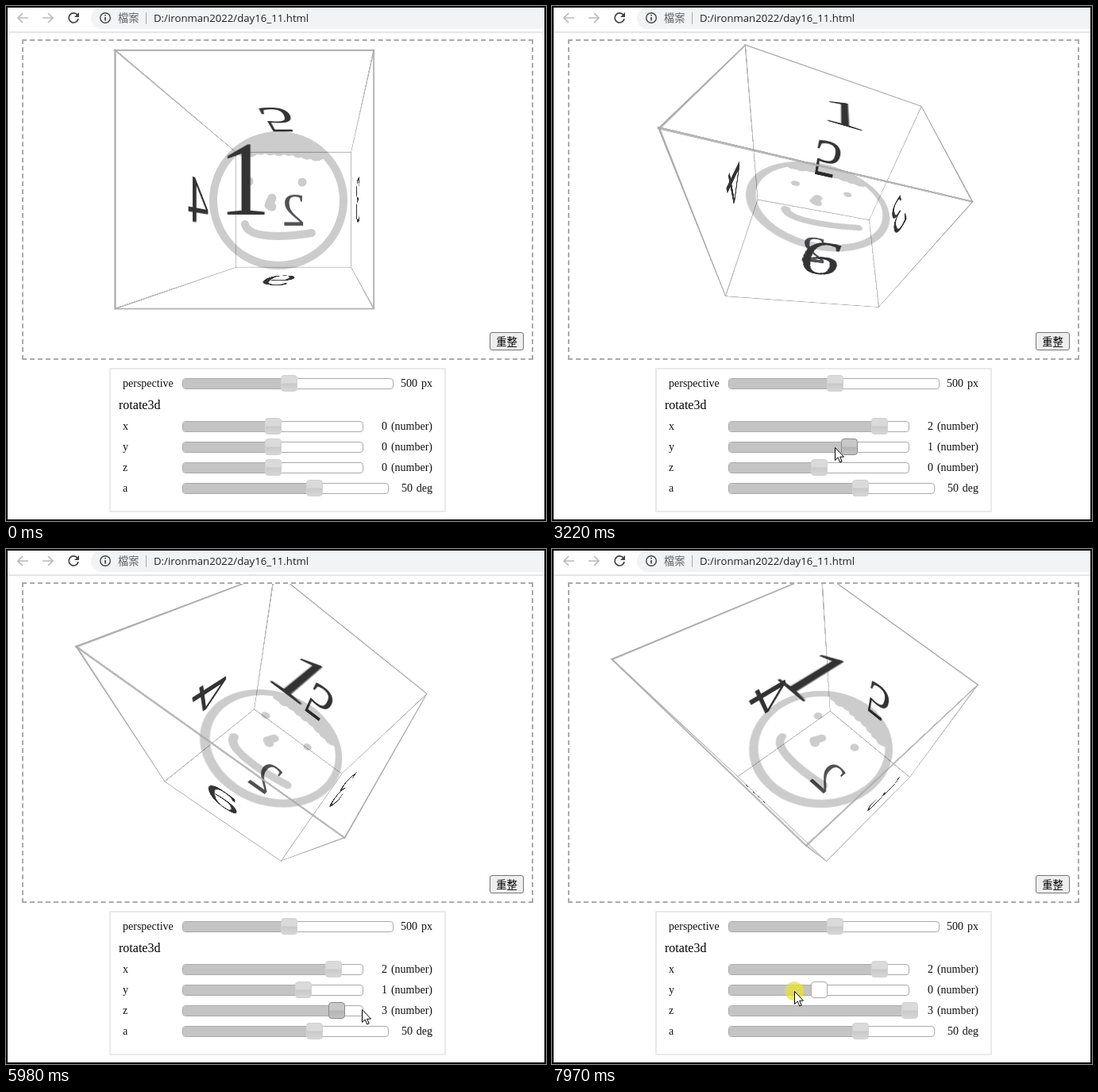
Write an HTML page that moves like this. It is 680 px wide and 649 px high and loops after 8000 ms.

```html
<!DOCTYPE html>
<html lang="zh-Hant">
<head>
<meta charset="utf-8">
<title>rotate3d</title>
<style>
html, body { margin: 0; width: 100%; height: 100%; overflow: hidden; background: #fff; }
body { position: relative; font: 14px/20px "Liberation Serif", serif; color: #111; }
body *, body::after { position: absolute; box-sizing: border-box; white-space: nowrap; }
body::after { content: ""; inset: 0; border: 2px solid #000; }
svg { overflow: visible; }
svg * { position: static; }

#pill { left: 107px; top: 2px; width: 580px; height: 27px; border-radius: 14px 0 0 14px; background: #f1f3f4; }
#line { left: 0; top: 32px; width: 100%; height: 2px; background: #e4e5e7; }
#icons { left: 0; top: 0; fill: none; stroke-width: 1.7; }
.bar { top: 5px; font: 13.2px/20px "Open Sans", "Noto Sans CJK TC", "Noto Sans CJK", sans-serif; color: #202124; }

#stage { left: 20px; top: 42px; width: 644px; height: 404px; border: 2px dashed #aaa;
  overflow: hidden; perspective: 353px; perspective-origin: 416px 260.5px; }
#cube { left: 320.5px; top: 200.5px; width: 0; height: 0; transform-style: preserve-3d; }
.face { left: -101px; top: -101px; width: 202px; height: 202px; border: 1px solid #aaa;
  font: 82px/200px "Liberation Serif", serif; text-align: center; color: #333; }
#smile { left: 0; top: 0; width: 1px; height: 1px; opacity: .2; fill: none; stroke: #000; stroke-linecap: round; stroke-linejoin: round; }
#reset { left: 609px; top: 411px; width: 43px; height: 23px; border: 1px solid #767676; border-radius: 3px;
  background: #efefef; font: 13.33px/22px "Noto Sans CJK TC", "Noto Sans CJK", sans-serif; text-align: center; color: #000; }

#panel { left: 130px; top: 456px; width: 424px; height: 182px; border: 2px solid #e9e9e9; }
#title { left: 142px; top: 493px; font-size: 16px; color: #000; }
.row { left: 0; width: 680px; height: 20px; }
.name { left: 147px; }
.unit { right: 143px; }
.track { left: 222px; top: 3px; height: 14px; border: 1px solid #aaa; border-radius: 4px; background: #fff; }
.fill { left: 0; top: 0; height: 12px; background: #c4c4c4; border-radius: 3px 0 0 3px; }
.knob { top: -1px; width: 21px; height: 21px; border-radius: 4px; border: 1px solid #d2d2d2;
  background: linear-gradient(#dadada 48%, #c9c9c9 52%, #d6d6d6); }
.knob.focus { border-color: #8c8c8c; background: linear-gradient(#c8c8c8 48%, #b4b4b4 52%, #c2c2c2); }
.knob.press { border-color: #aaa; background: #fff; }

#halo { width: 24px; height: 24px; margin: -12px; border-radius: 50%; background: rgba(232, 228, 40, .72); }
#cursor { left: 0; top: 0; width: 13px; height: 20px; }
</style>
</head>
<body>
<div id="pill"></div>
<div id="line"></div>
<svg id="icons" width="200" height="32">
  <path stroke="#bbb" d="M28 15H15M21 9l-6 6 6 6M46 15h13M53 9l6 6-6 6"/>
  <path stroke="#444" d="M90 11.5A6 6 0 1 0 91 16"/>
  <path fill="#444" d="M92 8v6h-6z"/>
  <circle cx="125" cy="15" r="6.3" stroke="#444" stroke-width="1.4"/>
  <path stroke="#444" d="M125 14v4.5M125 11v1.6"/>
  <path stroke="#aaa" stroke-width="1" d="M176.5 8v15"/>
</svg>
<div class="bar" style="left:141px;color:#5f6368">檔案</div>
<div class="bar" style="left:186px">D:/ironman2022/day16_11.html</div>

<div id="stage"><div id="cube">
  <svg id="smile">
    <circle r="82" stroke-width="10"/>
    <path fill="#000" stroke-width="9" d="M-46-60 Q0-105 48-62 L54-56 Q46-51 42-58 Q35-53 30-60 Q24-55 19-63 Q13-58 7-64 Q1-57-5-64 Q-11-58-16-65 Q-23-59-28-65 Q-33-56-38-61z"/>
    <path stroke-width="11" d="M-37-24h.01M30-23h.01M-8-3L-12 6L-8 8"/>
    <path stroke-width="10" d="M-42 30C-38 48 5 47 42 41"/>
  </svg>
</div></div>
<div id="reset">重整</div>

<div id="panel"></div>
<div id="title">rotate3d</div>
<div id="halo"></div>
<svg id="cursor"><path d="M.5 .5V16.5L4.2 13l2.6 6 2.4-1-2.5-5.8H11.5z" fill="#fff" stroke="#000"/></svg>

<script>
const LOOP = 8000, GLIDE = 400, TURN_DELAY = 80, ANGLE = 50;
const $ = id => document.getElementById(id);

// Press time, axis, value chosen
const clicks = [
  [1040, 0, 1], [1904, 0, 2], [2715, 1, 1], [3717, 2, 1],
  [4925, 2, 2], [5900, 2, 3], [7080, 1, 0], [8010, 1, -1]
];
// Time, x, y of the pointer
const path = [
  [200, 338, 609], [450, 376, 575], [700, 366, 524], [950, 371, 534], [1560, 371, 534],
  [1840, 402, 529], [2240, 402, 529], [2330, 389, 544], [2510, 356, 555], [3180, 356, 555],
  [3500, 364, 575], [3640, 366, 579], [4100, 366, 579], [4390, 395, 578], [4590, 397, 575],
  [4780, 397, 575], [4880, 408, 578], [5350, 408, 578], [5750, 448, 580], [6450, 448, 580],
  [6810, 361, 560], [7000, 345, 556], [7400, 345, 556], [7850, 305, 557], [8000, 305, 557]
];

const clamp = v => Math.min(1, Math.max(0, v));
const mix = (a, b, p) => a + (b - a) * p;
const swing = p => .5 - Math.cos(Math.PI * clamp(p)) / 2;
const smooth = p => (p = clamp(p), p * p * (3 - 2 * p));

const turns = ['', 'rotateY(180deg)', 'rotateY(90deg)', 'rotateY(-90deg)', 'rotateX(90deg)', 'rotateX(-90deg)'];
turns.forEach((turn, i) => {
  const face = document.createElement('div');
  face.className = 'face';
  face.textContent = i + 1;
  face.style.transform = `perspective(1000px) ${turn} translateZ(100px)`;
  if (i === 1) face.style.color = '#505054';
  $('cube').append(face);
});

function addRow(name, y, width, knobX, value, unit, gap) {
  const row = document.createElement('div');
  row.className = 'row';
  row.style.top = y - 10 + 'px';
  row.innerHTML = `<div class="name">${name}</div>
    <div class="track" style="width:${width}px"><div class="fill"></div></div><div class="knob"></div>
    <div class="unit">${unit}</div><div class="value" style="right:${143 + gap}px">${value}</div>`;
  $('halo').before(row);
  const [fill, knob, label] = ['.fill', '.knob', '.value'].map(s => row.querySelector(s));
  const move = x => {
    fill.style.width = x - 223 + 'px';
    knob.style.left = x - 10 + 'px';
  };
  move(knobX);
  return { knob, label, move };
}
addRow('perspective', 476, 266, 355.5, 500, 'px', 19);
const rows = ['x', 'y', 'z'].map((n, i) => addRow(n, 530 + 26 * i, 228, 336, 0, '(number)', 57));
addRow('a', 608, 260, 388, 50, 'deg', 25);

function quat(axis) {
  const len = Math.hypot(...axis), half = ANGLE * Math.PI / 360;
  return len ? [...axis.map(v => v / len * Math.sin(half)), Math.cos(half)] : [0, 0, 0, 1];
}
function slerp(a, b, p) {
  const o = Math.acos(Math.min(1, a.reduce((s, v, i) => s + v * b[i], 0)));
  if (o < 1e-5) return b;
  return a.map((v, i) => (v * Math.sin((1 - p) * o) + b[i] * Math.sin(p * o)) / Math.sin(o));
}

function pointer(t) {
  const i = Math.max(1, path.findIndex(k => k[0] > t));
  const [a, b] = [path[i - 1], path[i]], p = smooth((t - a[0]) / (b[0] - a[0]));
  return [mix(a[1], b[1], p), mix(a[2], b[2], p)];
}

function draw(t) {
  const values = [0, 0, 0], knobs = [0, 0, 0], target = [0, 0, 0];
  let q = quat(target), focus = -1, press = -1;
  for (const [start, axis, value] of clicks) {
    if (Math.abs(t - start) < 60) press = axis;
    if (t < start) continue;
    focus = axis;
    values[axis] = value;
    knobs[axis] = mix(knobs[axis], value, swing((t - start) / GLIDE));
    target[axis] = value;
    q = slerp(q, quat(target), smooth((t - start - TURN_DELAY) / GLIDE));
  }
  rows.forEach((row, i) => {
    row.move(336 + 38 * knobs[i]);
    row.label.textContent = values[i];
    row.knob.className = 'knob' + (i === press ? ' press' : i === focus ? ' focus' : '');
  });
  $('cube').style.transform = `rotate3d(${q.slice(0, 3).map(v => v.toFixed(6))},${(2 * Math.acos(Math.min(1, q[3]))).toFixed(6)}rad)`;

  const [x, y] = pointer(t);
  $('cursor').style.display = t < 200 ? 'none' : '';
  $('cursor').style.transform = `translate(${Math.round(x)}px,${Math.round(y)}px)`;
  $('halo').style.display = press < 0 ? 'none' : '';
  $('halo').style.left = x + 'px';
  $('halo').style.top = y + 'px';
}

function tick() {
  draw(performance.now() % LOOP);
  requestAnimationFrame(tick);
}
tick();
</script>
</body>
</html>
```
